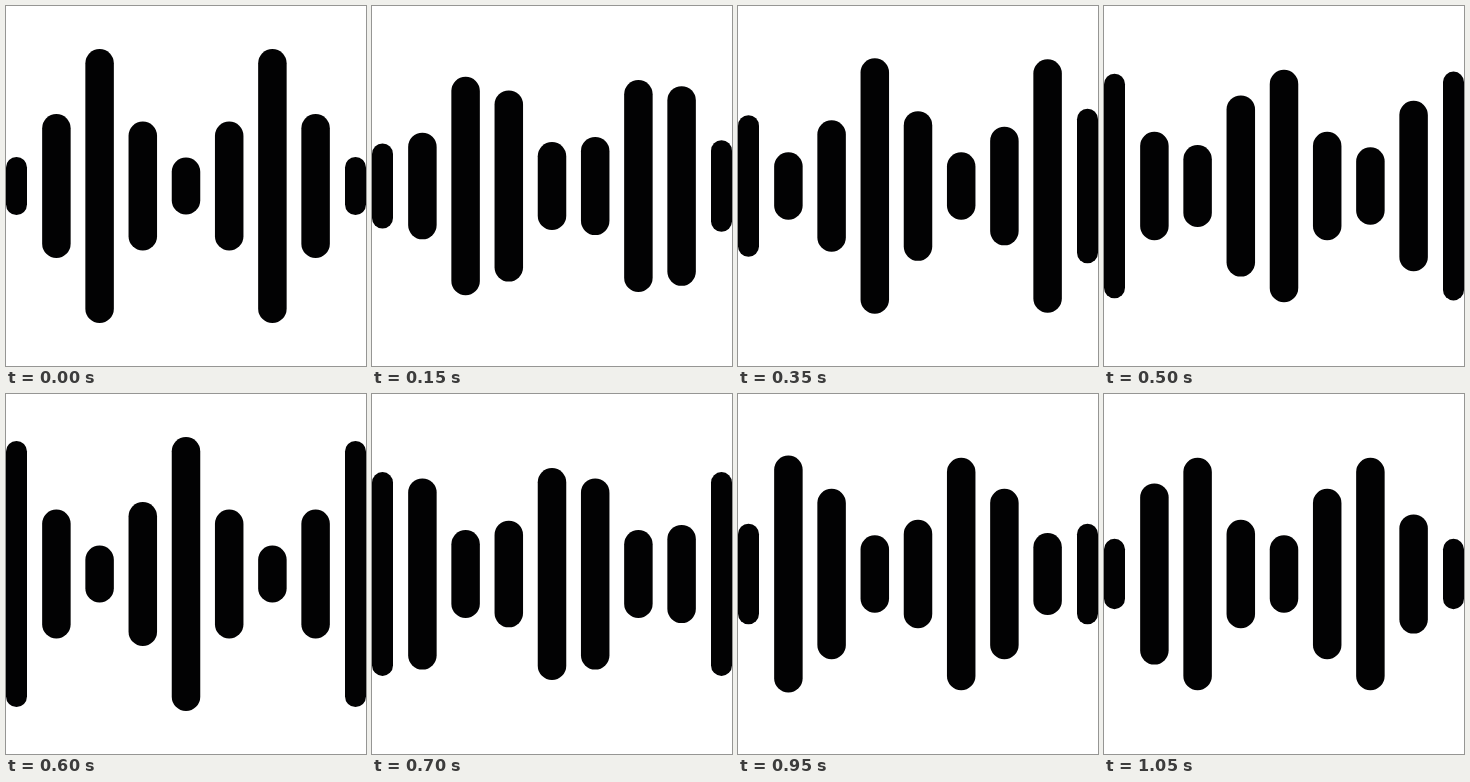
An HTML page with a canvas that plays this animation: 360x360 px, repeating every 1100 ms.

```html
<!DOCTYPE html>
<html lang="en">
<head>
<meta charset="utf-8">
<title>Sound bars</title>
<style>
  html, body { margin: 0; width: 100%; height: 100%; overflow: hidden; background: #fff; }
  canvas { display: block; width: 100vw; height: 100vh; }
</style>
</head>
<body>
<canvas id="stage" width="360" height="360"></canvas>
<script>
const ctx = document.getElementById('stage').getContext('2d');
const LOOP = 1100, TICK = 50, STEP = 40, LEG = 7;
const MID = 180, PITCH = 43.2, WIDTH = 28.5, EDGE = 21;

// Half-heights of each bar at the five ends of its four linear legs
const S = 28.5, M = 64.5, N = 72, L = 137;
const bars = [
  [29, 60.5, 133, 60.5, 25],
  [N, S, M, L, N],
  [L, N, S, M, L],
  [M, L, N, S, M],
  [S, M, L, M, S],
  [M, S, M, L, M],
  [L, M, S, M, L],
  [N, L, M, S, N],
  [29, 68, 133, 60.5, 25]
];

function halfHeight(keys, step) {
  const leg = Math.floor(step / LEG);
  const k = step / LEG - leg;
  return keys[leg] + (keys[leg + 1] - keys[leg]) * k;
}

function span(i) {
  if (i === 0) return [0, EDGE];
  if (i === bars.length - 1) return [360 - EDGE, EDGE];
  return [MID + (i - 4) * PITCH - WIDTH / 2, WIDTH];
}

function draw(time) {
  const t = Math.floor((time % LOOP) / TICK) * TICK;
  const step = Math.max(0, Math.ceil(t / STEP) - 1);
  ctx.fillStyle = '#fff';
  ctx.fillRect(0, 0, 360, 360);
  ctx.fillStyle = '#020203';
  bars.forEach((keys, i) => {
    const [x, w] = span(i);
    const h = halfHeight(keys, step);
    ctx.beginPath();
    ctx.roundRect(x, MID - h, w, h * 2, w / 2);
    ctx.fill();
  });
}

const start = performance.now();
function frame() {
  draw(performance.now() - start);
  requestAnimationFrame(frame);
}
frame();
</script>
</body>
</html>
```
